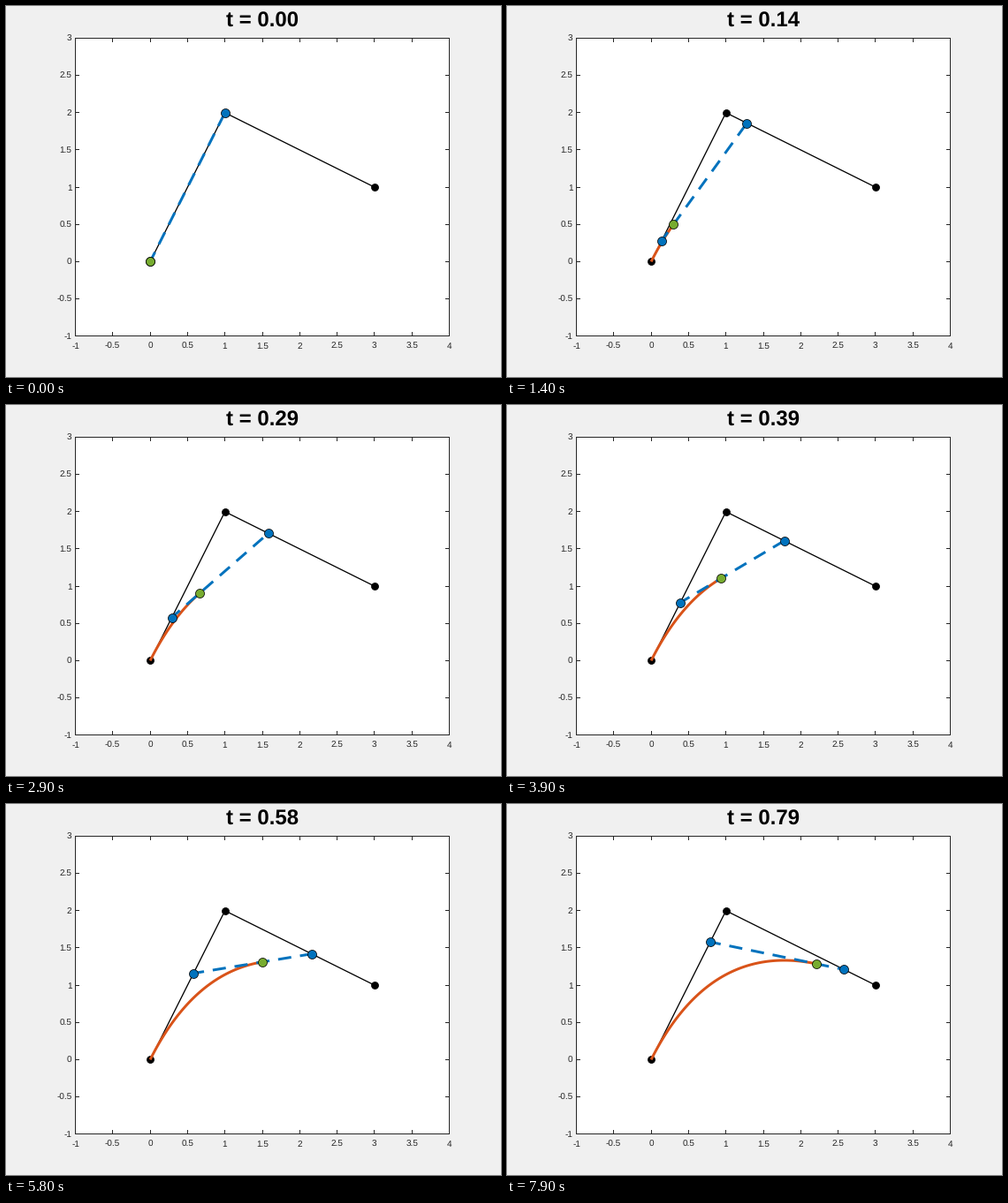
Write a matplotlib script that moves like this. It is 560 px wide and 420 px high and loops after 8000 ms.

```python
import numpy as np
import matplotlib.pyplot as plt
from matplotlib.animation import FuncAnimation
from matplotlib.patches import Rectangle

plt.rcParams.update({
    "font.family": "Liberation Sans",
    "text.hinting": "none",
    "path.snap": False,
    "toolbar": "None",
})

W, H, DPI = 560, 420, 100
PX = 72 / DPI                      # points per pixel
FRAMES, INTERVAL = 80, 100

BACK, INK = "#f0f0f0", "#262626"
BLUE, ORANGE, GREEN = "#0072bd", "#d95319", "#77ac30"

LEFT, TOP, SX, SY = 78.5, 36.5, 84.6, 84.3
P0, P1, P2 = np.array([[0, 0], [1, 2], [3, 1]], float)


def to_px(pts):
    """Plot units to stage pixels, y downwards."""
    x, y = np.asarray(pts, float).T
    return LEFT + (x + 1) * SX, TOP + (3 - y) * SY


def crisp(v):
    return np.floor(v) + 0.5


def mix(a, b, t):
    return a + (b - a) * t


def bezier(t):
    t = np.asarray(t)[:, None]
    return mix(mix(P0, P1, t), mix(P1, P2, t), t)


fig = plt.figure(figsize=(W / DPI, H / DPI), dpi=DPI, facecolor=BACK)
ax = fig.add_axes([0, 0, 1, 1])
ax.set(xlim=(0, W), ylim=(H, 0))
ax.axis("off")


def line(x, y, color, width, z, **kw):
    return ax.plot(x, y, color=color, lw=width * PX, zorder=z,
                   solid_capstyle="butt", **kw)[0]


def dots(pts, color, size, z):
    return ax.plot(*to_px(pts), "o", ms=size * PX, mfc=color, mec="black",
                   mew=0.75 * PX, zorder=z)[0]


def label(x, y, text, size, color=INK, **kw):
    return ax.text(x, y, text, fontsize=size * PX, color=color,
                   va="baseline", **kw)


# Box, ticks and labels
(x0, x1), (y0, y1) = map(crisp, to_px([(-1, 3), (4, -1)]))
ax.add_patch(Rectangle((x0, y0), x1 - x0, y1 - y0, fc="white", ec=INK,
                       lw=PX, joinstyle="miter", zorder=0))
TICK = 4.5
for v in np.arange(-1, 4.5, 0.5):
    x = crisp(LEFT + (v + 1) * SX)
    line([x, x], [y1, y1 - TICK], INK, 1, 1)
    line([x, x], [y0, y0 + TICK], INK, 1, 1)
    label(x, 388, f"{v:g}", 10, ha="center")
for v in np.arange(-1, 3.5, 0.5):
    y = crisp(TOP + (3 - v) * SY)
    line([x0, x0 + TICK], [y, y], INK, 1, 1)
    line([x1, x1 - TICK], [y, y], INK, 1, 1)
    label(74.3, y + 3.6, f"{v:g}", 10, ha="right")

# Control polygon and moving parts
line(*to_px([P0, P1, P2]), "black", 1.3, 2)
dots([P0, P1, P2], "black", 8, 3)
curve = line([], [], ORANGE, 3, 4)
chord = line([], [], BLUE, 3, 5, linestyle=(1, (5, 10 / 3)))
ends = dots([P0, P1], BLUE, 10, 6)
tip = dots([P0], GREEN, 10, 7)
title = label(290, 24, "", 24, "black", ha="center", weight="bold")


def update(i):
    t = i / 100
    a, b = mix(P0, P1, t), mix(P1, P2, t)
    curve.set_data(*to_px(bezier(np.arange(i + 1) / 100)))
    chord.set_data(*to_px([a, b]))
    ends.set_data(*to_px([a, b]))
    tip.set_data(*to_px([mix(a, b, t)]))
    title.set_text(f"t = {t:.2f}")
    return curve, chord, ends, tip, title


anim = FuncAnimation(fig, update, frames=FRAMES, interval=INTERVAL,
                     repeat=True, repeat_delay=0, blit=False)
plt.show()
```
